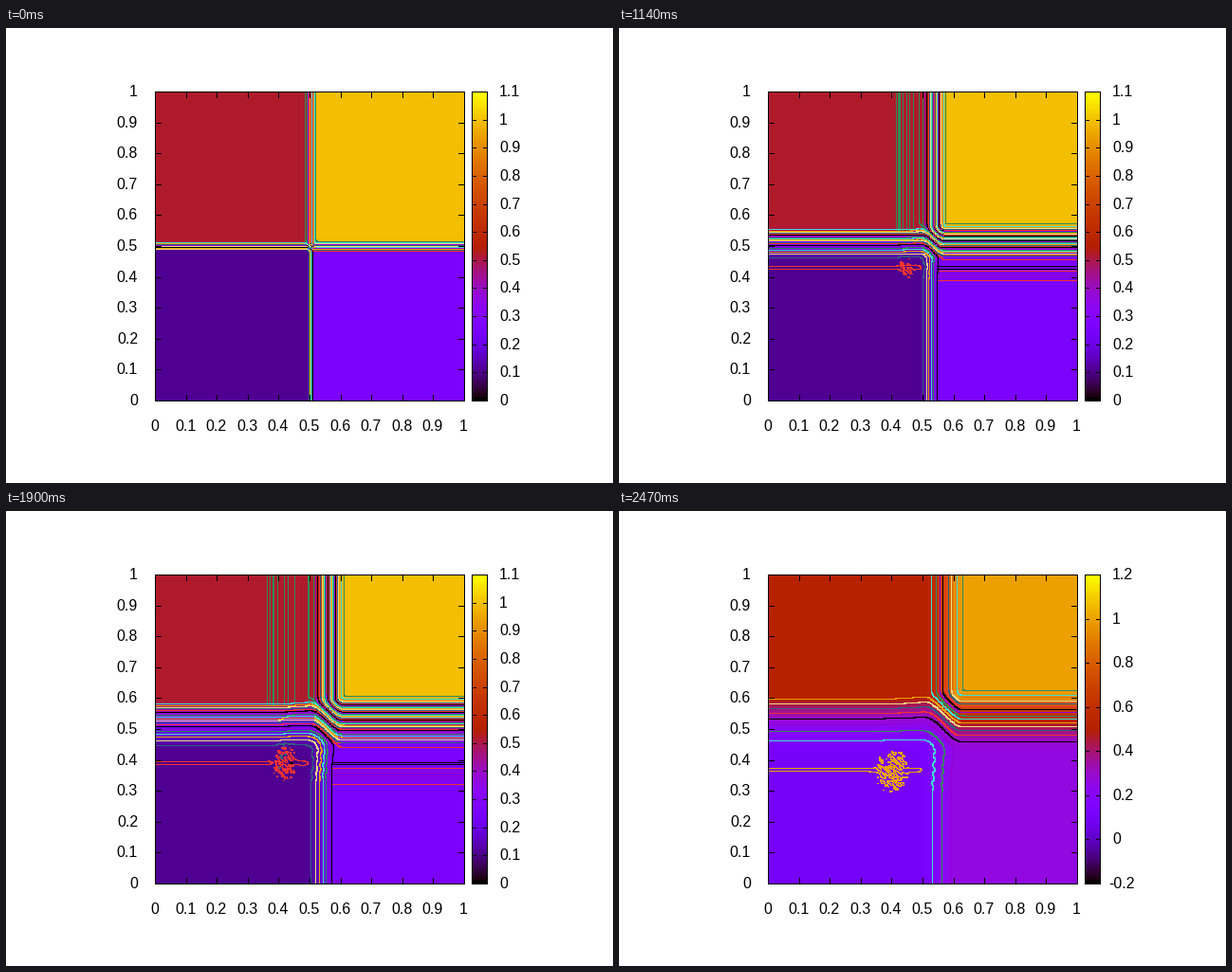
These frames come from a looping animation (640x480 px, 2660 ms). A matplotlib script:

```python
import math

import numpy as np
import matplotlib.pyplot as plt
from matplotlib.animation import FuncAnimation

FRAMES, STEP_MS = 14, 190
N = 200                        # grid cells per side
LO, HI = 50, 130               # nodes that waves can reach
C1 = math.sqrt(1.4)            # sound speed of the top right state
LEFT, BOTTOM, SIDE = 157.5, 393.5, 326
CYCLE = ["#9400d3", "#2e8b57", "#40e0d0", "#eba000",
         "#eedd82", "#306080", "#f03232", "#000000"]
TIMES = [0.0055 + 0.0072 * k for k in range(FRAMES - 1)] + [0.0935]

node = np.arange(N + 1) / N
X, Y = np.meshgrid(node, node)


def px(x):
    return LEFT + SIDE * x


def py(y):
    return BOTTOM - SIDE * y


def snap(v):
    """Move coordinates to the centre of their pixel."""
    return np.floor(v) + 0.5


# --- isentropic gas flow with four rarefactions: q = (u, v, c) ---

def sweep(q, speed=2.35):
    p = np.pad(q, ((0, 0), (0, 0), (2, 2)), mode="edge")
    d = np.diff(p, axis=2)
    a, b = d[..., :-1], d[..., 1:]
    total = a + b
    slope = 2 * np.maximum(a * b, 0) / np.where(total == 0, 1, total)
    mid = p[..., 1:-1]
    lft = (mid + slope / 2)[..., :-1]
    rgt = (mid - slope / 2)[..., 1:]
    gu, gv, gc = np.diff((lft + rgt) / 2, axis=2)
    u, v, c = q
    flow = np.stack([u * gu + 5 * c * gc, u * gv, u * gc + 0.2 * c * gu])
    return speed / 2 * np.diff(rgt - lft, axis=2) - flow


def flip(q):
    return q[[1, 0, 2]].swapaxes(1, 2)


def rate(q):
    return (sweep(q) + flip(sweep(flip(q)))) * N


def rise(center):
    return 0.5 + 0.5 * np.tanh((node[LO:HI + 1] - center) / 0.001)


def simulate():
    v, u = np.meshgrid(-1.4045 * (1 - rise(0.498)),
                       -0.7259 * (1 - rise(0.5)), indexing="ij")
    q = np.stack([u, v, C1 + (u + v) / 5])
    now, fields = 0.0, []
    for t in TIMES:
        n = math.ceil((t - now) / 0.0008)
        dt = (t - now) / n
        for _ in range(n):
            mid = q + dt * rate(q)
            q = (q + mid + dt * rate(mid)) / 2
        now = t
        rho = (q[2] / C1) ** 5
        fields.append(np.pad(rho, (LO, N - HI), mode="edge"))
    return fields


# --- start-up ripples carried along by the flow ---

rng = np.random.default_rng(7)
rough = rng.normal(size=X.shape)
diag = sum(np.roll(rough, (-i, i), (0, 1)) for i in range(4)) / 2
rows = sum(np.roll(rough, i, 1) for i in range(5)) / 2.2


def disturb(z, t):
    grow = t / 0.092
    xi, eta = (X - 0.5) / t, (Y - 0.5) / t
    dip = 0.011 * np.exp(-((Y - 0.5 + 1.4045 * t) / 0.008) ** 2)
    dip *= 0.5 * (1 - np.tanh((X - 0.505) / 0.01))
    blob = np.exp(-(((xi + 1.08) / 0.52) ** 2 + ((eta + 1.4) / 0.78) ** 2) ** 2)
    streak = np.sin(2 * np.pi * (X + Y) / 0.022 + 0.8 * diag) + 0.5 * rows - 0.2
    fan = np.exp(-((xi - 0.45) / 0.45) ** 4 - ((eta + 1.4) / 0.75) ** 8)
    wave = np.sin(2 * np.pi * Y / 0.03 + 40 * X)
    return z - dip + grow * (0.016 * blob * streak + 0.006 * fan * wave)


fields = [disturb(z, t) for z, t in zip(simulate(), TIMES)]


# --- drawing ---

def palette(f):
    f = np.clip(f, 0, 1)
    rgb = [np.sqrt(f), f ** 3, np.sin(2 * np.pi * f)]
    return np.clip(np.stack(rgb, axis=-1), 0, 1)


fig = plt.figure(figsize=(6.4, 4.8), dpi=100, facecolor="white")
ax = fig.add_axes([0, 0, 1, 1])
ax.axis("off")
HAIR = 0.36                    # half a pixel, fills exactly one when snapped


def line(xs, ys, color="black", z=5):
    return ax.plot(snap(xs), snap(ys), color=color, zorder=z, linewidth=HAIR,
                   antialiased=False, snap=False)[0]


def box(x0, x1):
    top = BOTTOM - SIDE
    line([x0, x1, x1, x0, x0], [BOTTOM, BOTTOM, top, top, BOTTOM])


def label(x, y, text, align):
    return ax.text(x, y, text, ha=align, va="baseline", color="black",
                   family="Liberation Sans", fontsize=11.52)


surface = ax.imshow(np.zeros((N, N, 3)), origin="lower", aspect="auto",
                    interpolation="nearest", zorder=1,
                    extent=(LEFT, LEFT + SIDE, BOTTOM, BOTTOM - SIDE))
ax.imshow(palette(np.linspace(0, 1, 128))[:, None], origin="lower",
          aspect="auto", interpolation="nearest", zorder=1,
          extent=(491.5, 507.5, BOTTOM, BOTTOM - SIDE))
ax.set_xlim(0, 640)
ax.set_ylim(480, 0)

for i in range(11):
    a = i / 10
    for x, d in ((LEFT, 6), (LEFT + SIDE, -6)):
        line([x, x + d], [py(a)] * 2)
    for y, d in ((BOTTOM, -6), (BOTTOM - SIDE, 6)):
        line([px(a)] * 2, [y, y + d])
    label(px(a) - 1, 425, f"{a:g}", "center")
    label(139, py(a) + 4.5, f"{a:g}", "right")
box(LEFT, LEFT + SIDE)
box(491.5, 507.5)

TOP_LEFT = [0, .05, .1, .13, .21, .33, .42, .55, .84, .92]
parts = []


def scale(lo, hi, step):
    for i in range(round((hi - lo) / step) + 1):
        val = round(lo + i * step, 2) + 0.0
        y = py((val - lo) / (hi - lo))
        parts.append(line([491.5, 495.5], [y, y]))
        parts.append(line([503.5, 507.5], [y, y]))
        parts.append(label(516 if val < 0 else 520, y + 4.5, f"{val:g}", "left"))


def ripples(t):
    x0, x1 = 0.5 - 1.764 * t, 0.5 + 0.312 * t
    for s in TOP_LEFT:
        x = px(x0 + s * (x1 - x0))
        parts.append(line([x, x], [py(0.5 + 1.04 * t), py(1)], CYCLE[1], 2))

    def across(y, color):
        parts.append(line([px(0.503 + 0.9 * t), px(1)], [py(y)] * 2, color, 2))

    n = int(6 * t / 0.092)
    for i in range(n):
        across(0.5 - (1.68 + 0.5 * (i + 0.5) / n) * t, CYCLE[0])
    for e in (0.55, 1.62, 2.28):
        across(0.5 - e * t, CYCLE[6])
    for d in (-0.004, 0.004):
        across(0.5 - 1.43 * t + d, CYCLE[7])


def contours(z, step, base):
    levels = np.arange(1, round(1 / step) + 1) * step
    colors = [CYCLE[round((base - v) / step) % 8] for v in levels]
    levels[-1] = 0.997
    cs = ax.contour(px(X), py(Y), z, levels=levels, colors=colors,
                    linewidths=HAIR, antialiased=False, zorder=3)
    cs.set_snap(False)
    for path in cs.get_paths():
        path.vertices = snap(path.vertices)
    parts.append(cs)


def update(k):
    while parts:
        parts.pop().remove()
    z, last = fields[k], k == FRAMES - 1
    lo, hi, tick = (-0.2, 1.2, 0.2) if last else (0, 1.1, 0.1)
    cells = (z[:-1, :-1] + z[1:, :-1] + z[:-1, 1:] + z[1:, 1:]) / 4
    surface.set_data(palette((cells - lo) / (hi - lo)))
    if last:
        contours(z, 0.05, 0.25)
    else:
        contours(z, 0.02, 0.54)
        ripples(TIMES[k])
    scale(lo, hi, tick)
    ax.set_xlim(0, 640)
    ax.set_ylim(480, 0)
    return [surface]


anim = FuncAnimation(fig, update, frames=FRAMES, interval=STEP_MS,
                     repeat=True, repeat_delay=0, blit=False)
plt.show()
```
